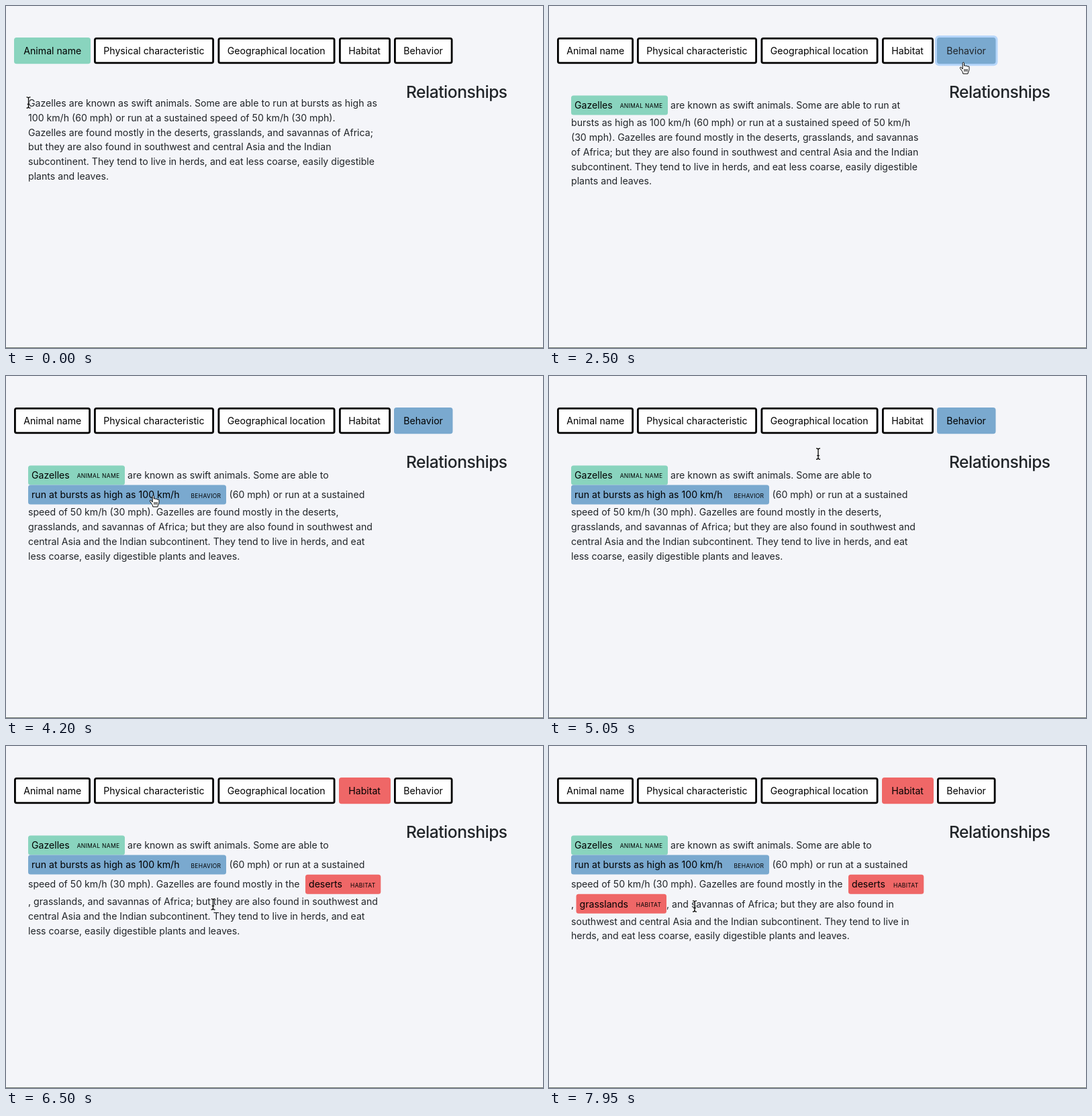
An HTML page that plays this animation: 800x510 px, repeating every 8000 ms.

```html
<!DOCTYPE html>
<html lang="en">
<head>
<meta charset="utf-8">
<title>Text annotation</title>
<style>
  html, body { margin: 0; width: 100%; height: 100%; overflow: hidden; background: #f4f5f9; }
  svg { display: block; width: 800px; height: 510px; }
  text { font: 14.12px Inter, "Open Sans", sans-serif; fill: #212529; white-space: pre; }
  text.dark { fill: #000; }
  text.label { font-size: 8.5px; letter-spacing: .3px; text-anchor: end; fill: #000; }
  text.title { font-size: 24.6px; font-weight: 500; letter-spacing: -.5px; }
</style>
</head>
<body>
<svg viewBox="0 0 800 510">
  <rect y="509" width="800" height="1" fill="#6f776f"/>
  <text class="title" x="596" y="137">Relationships</text>
  <g id="buttons"></g>
  <g id="selection" fill="#b3d7ff"></g>
  <g id="passage"></g>
  <g id="cursor"></g>
</svg>
<script>
const LOOP = 8000, LEFT = 33, TOP = 133.6;
const GREEN = '#89d4be', BLUE = '#7aa9cf', RED = '#ef6767';

// left edge, right edge, caption, color when active
const BUTTONS = [
  [12, 126, 'Animal name', GREEN],
  [131, 310, 'Physical characteristic', GREEN],
  [315.5, 490.5, 'Geographical location', GREEN],
  [496, 573, 'Habitat', RED],
  [578, 665.5, 'Behavior', BLUE],
];

const pill = (x, right, text, label, color) => ({ x, right, text, label, color });
const at = (x, text) => ({ x, text });

const gazelles = pill(33, 177, 'Gazelles', 'ANIMAL NAME', GREEN);
const run = pill(33, 328, 'run at bursts as high as 100 km/h', 'BEHAVIOR', BLUE);
const deserts = pill(446, 558.3, 'deserts', 'HABITAT', RED);
const grasslands = pill(40.5, 175, 'grasslands', 'HABITAT', RED);

const shortIntro = [gazelles, at(181, 'are known as swift animals. Some are able to')];
const runLine = [run, at(332.5, '(60 mph) or run at a sustained')];
const desertsLine = [at(LEFT, 'speed of 50 km/h (30 mph). Gazelles are found mostly in the'), deserts];
const herds = 'subcontinent. They tend to live in herds, and eat less coarse, easily digestible';
const asia = 'central Asia and the Indian subcontinent. They tend to live in herds, and eat';
const ending = 'less coarse, easily digestible plants and leaves.';

const LAYOUTS = [
  [
    'Gazelles are known as swift animals. Some are able to run at bursts as high as',
    '100 km/h (60 mph) or run at a sustained speed of 50 km/h (30 mph).',
    'Gazelles are found mostly in the deserts, grasslands, and savannas of Africa;',
    'but they are also found in southwest and central Asia and the Indian',
    herds, 'plants and leaves.',
  ], [
    [gazelles, at(181, 'are known as swift animals. Some are able to run at')],
    'bursts as high as 100 km/h (60 mph) or run at a sustained speed of 50 km/h',
    '(30 mph). Gazelles are found mostly in the deserts, grasslands, and savannas',
    'of Africa; but they are also found in southwest and central Asia and the Indian',
    herds, 'plants and leaves.',
  ], [
    shortIntro, runLine,
    'speed of 50 km/h (30 mph). Gazelles are found mostly in the deserts,',
    'grasslands, and savannas of Africa; but they are also found in southwest and',
    asia, ending,
  ], [
    shortIntro, runLine, desertsLine,
    ', grasslands, and savannas of Africa; but they are also found in southwest and',
    asia, ending,
  ], [
    shortIntro, runLine, desertsLine,
    [at(LEFT, ','), grasslands, at(175, ', and savannas of Africa; but they are also found in')],
    'southwest and central Asia and the Indian subcontinent. They tend to live in',
    'herds, and eat less coarse, easily digestible plants and leaves.',
  ],
];

// Each track is [start time, value]
const LAYOUT_TIMES = [[0, 0], [1050, 1], [3950, 2], [6300, 3], [7350, 4]];
const ACTIVE = [[0, 0], [2400, 4], [5550, 3]];
const RING = [[0, false], [2400, true], [3150, false], [5550, true], [5900, false]];
const POINTER = [[0, 'beam'], [1050, 'hand'], [1650, 'beam'], [1950, 'arrow'], [2250, 'hand'],
  [2700, 'arrow'], [2850, 'beam'], [3950, 'hand'], [4750, 'beam'], [5150, 'arrow'],
  [5400, 'hand'], [5700, 'beam'], [6300, 'hand'], [6380, 'beam'], [7350, 'hand'], [7750, 'beam']];

// time, x, y of the pointer's hot spot
const PATH = [
  [0, 33.5, 144], [450, 33.5, 144], [900, 90, 147], [1050, 92, 148], [1250, 115.5, 149],
  [1400, 115.5, 149], [2300, 617, 78], [2400, 617, 78], [2500, 617.5, 84], [2600, 617.5, 84],
  [3050, 487, 148], [3150, 487, 148], [3800, 217, 180], [4000, 219.5, 178], [4550, 219.5, 178],
  [5450, 530, 72], [5550, 530, 74], [5650, 521.5, 99], [5870, 446, 203], [5920, 446, 203],
  [6200, 498, 204], [6300, 498, 205], [6500, 308.5, 236], [6780, 41, 233], [6850, 41, 233],
  [7200, 113, 234], [7500, 115, 235], [7950, 217, 239], [8000, 217, 239],
];

// drag start, time the mark ends, line, x of the first letter, x of the last
const DRAGS = [[450, 1050, 0, 33, 89], [5920, 6300, 2, 446, 497], [6850, 7350, 3, 41, 113]];

const POINTERS = {
  beam: ['M-3-8.2Q0-8.2 0-6V6Q0 8.2-3 8.2M3-8.2Q0-8.2 0-6M3 8.2Q0 8.2 0 6M-1.8 2.5H1.8', 'none'],
  arrow: ['M0 0V14.5L3.4 11.4 5.6 16.4 7.8 15.4 5.6 10.5H10.3Z', '#000'],
  hand: ['M-1.3 10L-2.7 8.1Q-3.9 6.7-4.9 7.5-5.5 8.3-4.5 9.7L-1.7 13.7Q-.9 15-.7 17H6.5' +
    'Q6.7 15 7.7 13.3 8.5 11.5 8.5 9.8V7.1Q8.5 5.8 7.3 5.9 6.4 5.9 6.2 6.5 5.9 5.1 4.7 5.2' +
    ' 3.8 5.2 3.5 5.8 3.1 4.7 2.1 4.8 1.2 4.9 1 5.3V1.5Q.9.1-.2.1-1.4.2-1.3 1.5Z' +
    'M1.4 10v3.8M3.5 10v3.8M5.6 10v3.8', '#fff'],
};

const value = (track, t) => track.findLast(([start]) => start <= t)[1];
const rect = (x, y, w, h, extra = '') =>
  `<rect x="${x}" y="${y}" width="${w}" height="${h}" ${extra}/>`;
const words = (x, y, text, style = '') => `<text class="${style}" x="${x}" y="${y}">${text}</text>`;

function drawButtons(active, ring) {
  return BUTTONS.map(([x, right, caption, color], i) => {
    const on = i === active, w = right - x, focused = on && ring;
    const halo = focused
      ? rect(x - 3, 44, w + 6, 45.3, 'rx="6" fill="#007bff" fill-opacity=".25"') : '';
    const box = rect(x + 1.4, 48.4, w - 2.8, 36.5,
      `rx="2.4" fill="${on ? color : '#fff'}" stroke="${on ? color : '#000'}" stroke-width="2.8"`);
    return halo + box + words(x + 14.3, 72, caption, focused ? '' : 'dark');
  }).join('');
}

function drawPassage(lines) {
  let top = TOP;
  return lines.map(line => {
    const items = Array.isArray(line) ? line : [at(LEFT, line)];
    const tall = items.some(item => item.label);
    const y = top + (tall ? 19.5 : 16.3);
    const lineTop = top;
    top += tall ? 29.15 : 21.82;
    return items.map(({ x, right, text, label, color }) => label
      ? rect(x, lineTop - .2, right - x, 29, `rx="3.5" fill="${color}"`) +
        words(x + 5, y, text, 'dark') + words(right - 7.7, y - .7, label, 'label')
      : words(x, y, text)).join('');
  }).join('');
}

function drawSelection(t, layout, x, y) {
  const bar = (line, from, to) => {
    const tall = LAYOUTS[layout].slice(0, line).filter(Array.isArray).length;
    const own = Array.isArray(LAYOUTS[layout][line]) ? 3.2 : 0;
    return rect(from, TOP + line * 21.82 + tall * 7.33 + own, Math.max(0, to - from), 21.82);
  };
  if (t >= 3150 && t < 3950) {
    return y < 162 ? bar(0, Math.min(x, 487), 487) : bar(0, 486, 528) + bar(1, LEFT, Math.min(x, 217));
  }
  const drag = DRAGS.find(([start, end]) => t >= start && t < end);
  return drag ? bar(drag[2], drag[3], Math.min(x, drag[4])) : '';
}

function drawPointer(kind) {
  const [d, fill] = POINTERS[kind];
  const beam = kind === 'beam';
  const stroke = kind === 'arrow' ? '#fff' : '#000';
  return (beam ? `<path d="${d}" fill="none" stroke="#fff" stroke-width="2.8" stroke-opacity=".7"/>` : '') +
    `<path d="${d}" fill="${fill}" stroke="${stroke}" stroke-width="${beam ? 1.3 : 1}" stroke-linejoin="round"/>`;
}

function position(t) {
  const i = PATH.findIndex(([time]) => time > t);
  const [t0, x0, y0] = PATH[i - 1], [t1, x1, y1] = PATH[i];
  const u = (t - t0) / (t1 - t0), k = u * u * (3 - 2 * u);
  return [x0 + (x1 - x0) * k, y0 + (y1 - y0) * k];
}

const drawn = {};
function show(id, markup) {
  if (drawn[id] !== markup) document.getElementById(id).innerHTML = drawn[id] = markup;
}

const cursor = document.getElementById('cursor');
const begin = performance.now();

function frame() {
  const t = (performance.now() - begin) % LOOP;
  const layout = value(LAYOUT_TIMES, t);
  const [x, y] = position(t);
  show('buttons', drawButtons(value(ACTIVE, t), value(RING, t)));
  show('passage', drawPassage(LAYOUTS[layout]));
  show('selection', drawSelection(t, layout, x, y));
  show('cursor', drawPointer(value(POINTER, t)));
  cursor.setAttribute('transform', `translate(${x} ${y})`);
  requestAnimationFrame(frame);
}
frame();
</script>
</body>
</html>
```
